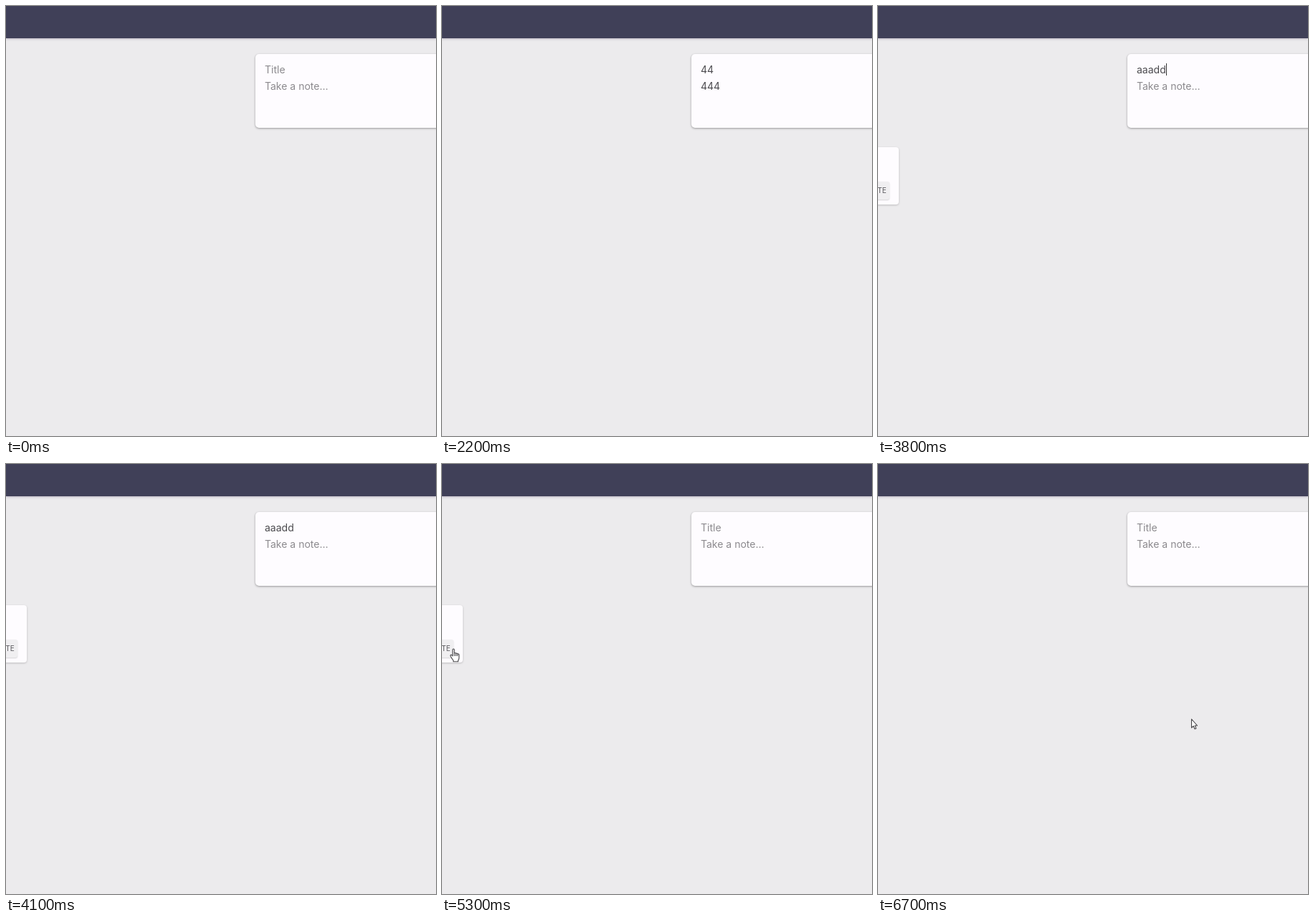
Write an HTML page that moves like this. It is 600 px wide and 600 px high and loops after 7.1 s.

```html
<!DOCTYPE html>
<html lang="en">
<head>
<meta charset="utf-8">
<title>Notes</title>
<style>
html, body { margin: 0; width: 100%; height: 100%; overflow: hidden; }
body { position: relative; background: #ecebed; font: 14px/20px Inter, "Open Sans", sans-serif; color: #4b4a4e; }
header { position: absolute; left: 0; top: 0; width: 100%; height: 44.5px; background: #404058; box-shadow: 0 1px 3px rgba(90, 75, 110, .35); }
.form, .note { position: absolute; background: #fefcff; white-space: nowrap; }
.form { left: 348px; top: 67px; width: 300px; height: 103px; border-radius: 5px; box-shadow: 0 1px 3px rgba(0, 0, 0, .36); }
.field { position: absolute; left: 13px; }
#title { top: 12px; }
#body { top: 35px; }
.hint { color: #8c8a8e; }
.caret { display: inline-block; width: 1px; height: 17px; margin-right: -1px; vertical-align: -3px; background: #333; }
.note { top: 196.5px; width: 171px; border-radius: 4px; box-shadow: 0 1px 3px rgba(0, 0, 0, .2); font-size: 13px; color: #222; }
.note b { position: absolute; left: 7px; top: 4.5px; font-weight: 500; }
.note p { position: absolute; left: 7px; top: 24px; margin: 0; }
.note i { position: absolute; right: 13px; bottom: 7px; width: 46px; height: 25px; border-radius: 3px; background: #f0eff1; box-shadow: 0 1px 2px rgba(0, 0, 0, .17); font: 10px/25px Inter, "Open Sans", sans-serif; color: #59585c; text-align: center; }
#first { left: -142px; height: 80.5px; }
#second { left: 52px; height: 61.5px; }
svg { position: absolute; left: 0; top: 0; width: 600px; height: 600px; }
</style>
</head>
<body>
<header></header>
<div class="form">
  <div class="field" id="title"></div>
  <div class="field" id="body"></div>
</div>
<div class="note" id="first"><b>44</b><p>444</p><i>DELETE</i></div>
<div class="note" id="second"><b>aaadd</b><i>DELETE</i></div>
<svg viewBox="0 0 600 600">
  <g id="beam" fill="none" stroke="#555" stroke-width="1.1">
    <path d="M-2.8-5.7Q-.5-5.7 0-4.5Q.5-5.7 2.8-5.7M0-4.5V4.5M-2.8 5.7Q-.5 5.7 0 4.5Q.5 5.7 2.8 5.7M-1.5 1.5H1.5"/>
  </g>
  <g id="arrow" fill="#fff" stroke="#454447" stroke-width="1.1" stroke-linejoin="round">
    <path d="M0 0V12L2.7 9.7L4.5 13.7L6.4 12.9L4.7 9H8Z"/>
  </g>
  <g id="hand" fill="#fff" stroke="#454447" stroke-width="1.1" stroke-linejoin="round">
    <path d="M-3.2 1V-7.5Q-3.2-9-2-9Q-.8-9-.8-7.5V-3.2Q.4-4 1.5-2.8Q2.8-3.4 3.7-2.1Q5.8-2.5 5.8-.4V3.5Q5.8 5.6 4.5 7V8.8H-2.2V7Q-4 5-6 1.2Q-6.6-.4-5.3-.7Q-4.3-.7-3.2 1ZM-.8-3.2V1M1.5-2.8V1M3.7-2.1V1"/>
  </g>
</svg>
<script>
const LOOP = 7100, STEP = 100;
const el = id => document.getElementById(id);
const shapes = ['beam', 'arrow', 'hand'];

// time, shape, x, y
const pointer = [
  [0, '', 0, 0],
  [400, 'beam', 465, 162], [600, 'beam', 420, 92], [700, 'beam', 420, 92],
  [900, 'beam', 447, 144], [1400, '', 447, 144],
  [2500, 'beam', 589, 130], [2700, 'beam', 509, 135], [2800, 'beam', 509, 135],
  [3000, 'beam', 440, 92], [3300, 'beam', 440, 92], [3400, 'beam', 526, 143],
  [3500, '', 0, 0],
  [4400, 'arrow', 551, 272], [4600, 'hand', 198, 253], [4900, 'hand', 198, 253],
  [5000, 'arrow', 193, 246], [5200, 'arrow', 60, 258],
  [5300, 'hand', 18, 267], [5400, 'hand', 16, 266], [5600, 'hand', 9, 262],
  [5700, 'arrow', 20, 265], [6200, 'arrow', 425, 351], [6300, 'arrow', 439.5, 357],
  [6400, 'arrow', 439.5, 357], [6500, 'arrow', 438.5, 356], [6600, 'arrow', 438.5, 356],
  [6700, 'arrow', 437.5, 356], [LOOP, '', 437.5, 356]
];

// time, title, body, focused field
const typing = [
  [0, '', '', ''], [700, '', '', 'title'], [1200, '4', '', 'title'],
  [1400, '44', '', 'title'], [1500, '44', '', 'body'], [1600, '44', '4', 'body'],
  [1700, '44', '44', 'body'], [1800, '44', '444', 'body'], [2000, '44', '444', ''],
  [2400, '', '', ''], [3000, '', '', 'title'], [3100, 'a', '', 'title'],
  [3400, 'aa', '', 'title'], [3500, 'aaa', '', 'title'], [3600, 'aaad', '', 'title'],
  [3700, 'aaadd', '', 'title'], [4000, 'aaadd', '', ''], [4300, '', '', '']
];

const indexAt = (list, t) => list.findLastIndex(k => k[0] <= t);

function setField(id, text, hint, focused) {
  const caret = focused ? '<span class="caret"></span>' : '';
  el(id).innerHTML = text ? text + caret : caret + `<span class="hint">${hint}</span>`;
}

function setPointer(t) {
  const i = indexAt(pointer, t);
  const [t0, shape, x0, y0] = pointer[i];
  const [t1, next, x1, y1] = pointer[i + 1];
  const k = next ? (t - t0) / (t1 - t0) : 0;
  const place = `translate(${x0 + (x1 - x0) * k} ${y0 + (y1 - y0) * k})`;
  for (const id of shapes) {
    el(id).style.display = id === shape ? '' : 'none';
    el(id).setAttribute('transform', place);
  }
}

function show(id, t, from, to) {
  el(id).style.display = t >= from && t < to ? '' : 'none';
}

function draw(t) {
  const [, title, body, focus] = typing[indexAt(typing, t)];
  setField('title', title, 'Title', focus === 'title');
  setField('body', body, 'Take a note…', focus === 'body');
  show('first', t, 2400, 5700);
  show('second', t, 4300, 5000);
  setPointer(t);
}

const start = performance.now();
let last = -1;
function tick() {
  const t = Math.floor((performance.now() - start) % LOOP / STEP) * STEP;
  if (t !== last) draw(last = t);
  requestAnimationFrame(tick);
}
tick();
</script>
</body>
</html>
```
